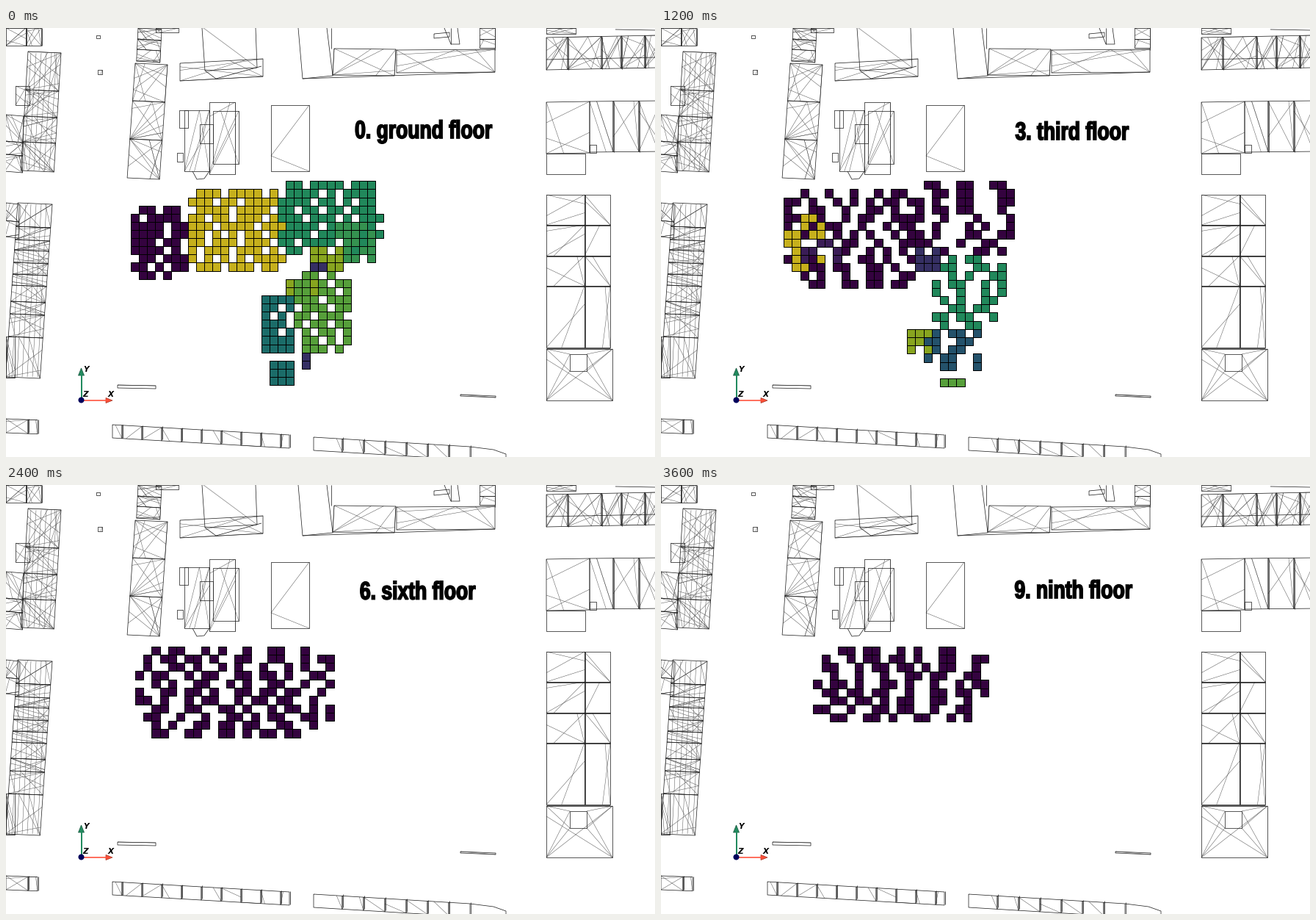
These frames come from a looping animation (884x584 px, 4000 ms). A matplotlib script:

```python
import random
import matplotlib.pyplot as plt
from matplotlib.animation import FuncAnimation
from matplotlib.collections import LineCollection, PolyCollection
from matplotlib.patches import Circle, PathPatch, Polygon
from matplotlib.textpath import TextPath
from matplotlib.transforms import Affine2D

W, H, DPI = 884, 584, 100
PX = 72 / DPI
rng = random.Random(4)

fig = plt.figure(figsize=(W / DPI, H / DPI), dpi=DPI, facecolor="white")
ax = fig.add_axes([0, 0, 1, 1])
ax.set(xlim=(0, W), ylim=(H, 0))
ax.axis("off")

# ---------- surrounding buildings, as wireframes ----------
bold, thin = [], []


def line(*v):
    bold.append(list(zip(v[::2], v[1::2])))


def mix(a, b, t):
    return a[0] + (b[0] - a[0]) * t, a[1] + (b[1] - a[1]) * t


def slab(n, x0, y0, x1, y1, skew=0, tilt=0):
    """Leaning box with n chords running from its corners to its sides."""
    p = [(x0, y0), (x1, y0 + tilt), (x1 + skew, y1 + tilt), (x0 + skew, y1)]
    bold.append(p + p[:1])
    for _ in range(n):
        i = rng.randrange(4)
        j = i + rng.choice((1, 2))
        t = rng.choice((.3, .6, .8, 1))
        thin.append([p[i], mix(p[j % 4], p[(j + 1) % 4], t)])


def column(n, x0, x1, lean, *ys):
    """Houses stacked down the page between the given heights."""
    for a, b in zip(ys, ys[1:]):
        off = lean * (a - ys[0])
        slab(n, x0 - off, a, x1 - off, b, -lean * (b - a), 2 if lean else 0)


def row(n, y0, y1, slope, *xs):
    """Houses side by side along a sloping street."""
    for a, b in zip(xs, xs[1:]):
        dy = slope * (a - xs[0])
        slab(n, a, y0 + dy, b, y1 + dy, 0, slope * (b - a))
        if b < W:
            line(b + 1, y0 + dy, b + 1, y1 + dy)


# east
levels = (227, 268, 310, 351, 435)
column(3, 736, 788, 0, *levels)
column(2, 788, 823, 0, *levels)
for y in levels[1:]:
    line(736, y + 1, 823, y + 1)
line(789, 227, 789, 435)
slab(2, 736, 437, 826, 507)
slab(0, 768, 444, 791, 467)
for x, u in ((736, 768), (826, 791)):
    for y, v in ((437, 444), (507, 467)):
        thin.append([(x, y), (u, v)])
        thin.append([(x, y), (u, 911 - v)])

# north-east
slab(4, 736, 101, 795, 171, 0, -1)
slab(0, 736, 171, 789, 199)
row(3, 100, 169, -.01, 795, 827, 862, 900)
slab(0, 795, 159, 804, 170)
row(9, 13, 57, -.02, 736, 765, 811, 838, 870, 899)
line(736, 43, 884, 40)
slab(5, 736, 0, 776, 8)
line(830, 2, 884, 3)

# north
line(398, 0, 404, 69, 445, 65, 437, 0)
line(404, 69, 666, 60)
slab(7, 447, 28, 531, 64, -2, 1)
slab(6, 532, 30, 666, 61, 0, -1)
line(443, 0, 443, 28)
line(666, 0, 666, 30)
slab(0, 583, 8, 604, 14, 0, -2)
line(597, 0, 606, 22, 618, 22, 615, 0)
line(606, 0, 606, 22)
column(2, 645, 666, 0, 0, 15, 27)
line(267, 0, 271, 58, 342, 54, 340, 0)
slab(5, 237, 48, 350, 72, 0, -6)
line(271, 58, 286, 69, 348, 52)
thin.append([(269, 0), (342, 54)])

# detached houses
slab(4, 277, 101, 312, 199)
slab(2, 282, 113, 317, 185)
slab(5, 243, 112, 277, 195)
slab(0, 236, 112, 248, 136)
slab(0, 233, 170, 241, 182)
slab(0, 264, 131, 282, 157)
line(254, 195, 260, 206, 270, 205, 277, 195)
slab(0, 361, 105, 413, 195)
thin.append([(413, 105), (361, 174), (413, 195)])
slab(0, 123, 10, 128, 14)
slab(1, 125, 57, 131, 63)

# west
column(8, 180, 212, .05, 0, 15, 29, 45)
column(9, 176, 220, .07, 48, 99, 151, 204)
slab(2, 204, 0, 235, 6)
column(11, 30, 75, .06, 32, 84, 120, 155, 194)
column(7, 0, 24, .02, 118, 154, 172, 195)
slab(3, 13, 79, 32, 105)
row(6, 0, 24, 0, 0, 27, 48)
column(7, 16, 63, .07, 238, 270, 288, 302, 319, 335, 350, 372, 389, 420, 475)
column(5, 0, 18, .02, 238, 262, 284)
slab(5, 0, 420, 12, 476)
for i in range(6):
    thin.append([(20 + 7 * i, 240), (8 + 7 * i, 475)])
    thin.append([(34 + 7 * i, 34), (24 + 7 * i, 194)])

# kerbs and southern rows
slab(1, 152, 486, 204, 490, 0, 1)
slab(1, 619, 499, 667, 501, 0, 2)
row(1, 540, 558, .058, 145, 158, *range(185, 377, 27), 386)
row(1, 557, 575, .061, 419, *range(458, 640, 29))
line(632, 570, 664, 574, 681, 580, 681, 584)
row(3, 532, 551, .04, 0, 30, 43)

ax.add_collection(LineCollection(thin, colors="#555555", linewidths=.5 * PX))
ax.add_collection(LineCollection(bold, colors="#222222", linewidths=.75 * PX))

# ---------- axis marker ----------
RED, GREEN = "#ff4f38", "#228b5f"
ax.plot([102.5, 102.5], [506, 472], color=GREEN, lw=2 * PX)
ax.plot([102, 138], [507, 507], color=RED, lw=1.6 * PX)
ax.add_patch(Polygon([(102.5, 463), (98.5, 473), (106.5, 473)], fc=GREEN, ec="#14513a", lw=.5))
ax.add_patch(Polygon([(145, 507), (136, 503.5), (136, 510.5)], fc=RED, ec="#a03020", lw=.5))
ax.add_patch(Circle((102.5, 506.5), 4, fc="#00005c", ec="none", zorder=5))
for x, y, s in ((109, 468, "Y"), (143, 502, "X"), (108, 502, "Z")):
    ax.text(x, y, s, family="DejaVu Sans", weight="bold", style="italic",
            size=10.5 * PX, ha="center", va="baseline")

# ---------- floors ----------
PLUM, VIOLET, INDIGO, NAVY = "#34033f", "#3a1c56", "#352f63", "#2c3f69"
BLUE, PETROL, TEAL, JADE = "#24526b", "#1b6c69", "#1b7668", "#21885b"
MID, LEAF, OLIVE, GOLD = "#359250", "#569f3a", "#88a51f", "#c6b01c"
floors = [{} for _ in range(10)]


def zone(k, color, c0, r0, c1, r1, fill=1):
    """Rounded patch of cells; below a fill of 1, rows break into random runs."""
    cm, rm = (c0 + c1) / 2, (r0 + r1) / 2
    for r in range(r0, r1 + 1):
        c, on = c0, rng.random() < fill
        while c <= c1:
            n = rng.randint(1, 1 + int(3.5 * fill if on else 3 * (1 - fill)))
            for i in range(c, min(c + n, c1 + 1)):
                u, v = abs(i - cm) / (c1 - cm + .5), abs(r - rm) / (r1 - rm + .5)
                if fill == 1 or on and u ** 3 + v ** 3 < 1.3:
                    floors[k][i, r] = color
            c, on = c + n, not on


zone(0, PLUM, 0, 3, 6, 11, .9)
zone(0, GOLD, 7, 1, 18, 10, .9)
zone(0, JADE, 18, 0, 30, 8, .9)
zone(0, MID, 25, 5, 29, 9, .9)
zone(0, OLIVE, 22, 8, 25, 10, .9)
zone(0, OLIVE, 19, 12, 22, 13, .9)
zone(0, LEAF, 20, 11, 26, 20, .8)
zone(0, PETROL, 16, 14, 19, 20, .9)
zone(0, PETROL, 17, 22, 19, 24)
zone(0, INDIGO, 22, 10, 23, 10)
zone(0, INDIGO, 21, 21, 21, 22)

zone(1, PLUM, 0, 4, 4, 11, .4)
zone(1, PLUM, 5, 1, 9, 7, .4)
zone(1, GOLD, 14, 6, 14, 7)
zone(1, GOLD, 13, 4, 13, 4)
zone(1, GOLD, 15, 4, 15, 4)
zone(1, JADE, 19, 0, 28, 8, .15)
zone(1, TEAL, 14, 8, 19, 15, .7)
zone(1, TEAL, 11, 16, 16, 22, .7)
zone(1, TEAL, 15, 22, 19, 24, .7)
zone(1, VIOLET, 16, 11, 19, 17, .3)
zone(1, LEAF, 20, 15, 22, 18, .4)
zone(1, BLUE, 25, 8, 30, 15, .6)
zone(1, NAVY, 21, 17, 29, 24, .7)

zone(2, PLUM, 0, 1, 14, 11, .7)
zone(2, PLUM, 15, 0, 27, 5, .7)
zone(2, OLIVE, 0, 5, 4, 10, .3)
zone(2, LEAF, 20, 4, 24, 7, .7)
zone(2, LEAF, 26, 0, 27, 0)
zone(2, LEAF, 28, 1, 28, 1)
zone(2, INDIGO, 15, 3, 19, 9, .7)
zone(2, TEAL, 20, 7, 28, 17, .7)
zone(2, NAVY, 23, 7, 26, 10, .8)
zone(2, VIOLET, 16, 13, 20, 19, .7)
zone(2, JADE, 13, 16, 16, 24, .3)
zone(2, BLUE, 18, 18, 26, 24, .5)

zone(3, PLUM, 0, 1, 16, 12, .5)
zone(3, PLUM, 15, 0, 27, 8, .3)
zone(3, GOLD, 0, 4, 4, 10, .4)
zone(3, VIOLET, 2, 7, 6, 9, .3)
zone(3, INDIGO, 16, 8, 18, 10, .9)
zone(3, JADE, 18, 9, 26, 17, .4)
zone(3, OLIVE, 15, 18, 18, 20, .8)
zone(3, BLUE, 17, 18, 23, 22, .5)
zone(3, LEAF, 19, 24, 21, 24)

zone(4, PLUM, 0, 1, 20, 12, .5)
zone(4, PLUM, 18, 0, 27, 8, .4)
zone(4, GOLD, 0, 4, 4, 9, .3)

zone(5, PLUM, 0, 1, 21, 12, .5)
zone(5, PLUM, 18, 0, 27, 7, .4)

zone(6, PLUM, 1, 1, 24, 11, .4)

for c, r, n, m in ((8, 2, 2, 1), (6, 4, 2, 2), (9, 6, 1, 1), (8, 7, 2, 1), (15, 4, 1, 2),
                   (16, 5, 1, 2), (17, 6, 1, 2), (18, 7, 1, 1), (20, 5, 2, 2), (22, 6, 1, 1)):
    zone(7, PLUM, c, r, c + n - 1, r + m - 1)

zone(8, PLUM, 4, 1, 24, 9, .4)
zone(9, PLUM, 4, 1, 24, 9, .4)

NAMES = "ground first second third fourth fifth sixth seventh eighth ninth".split()
CENTRES = (569, 553, 568.5, 560, 568, 560.5, 561, 561, 567, 562)
BASES = (151, 149, 157, 153, 154, 158, 156.5, 157, 154, 155)
FACE = dict(family="Liberation Sans", weight="bold")
NARROW = .78


def title(k):
    path = TextPath((0, 0), f"{k}. {NAMES[k]} floor", size=34, prop=FACE)
    b = path.get_extents()
    place = Affine2D().translate(-(b.x0 + b.x1) / 2, 0).scale(NARROW, -1)
    return place.translate(CENTRES[k], BASES[k] - 1).transform_path(path)


def square(c, r, pitch):
    # higher floors are nearer the camera, so they spread from a vanishing point
    x0, x1 = (round(510 + (c + d - 30.7) * pitch) + .5 for d in (0, 1))
    y0, y1 = (round(207.3 + (r + d) * pitch) + .5 for d in (0, 1))
    return [(x0, y0), (x1, y0), (x1, y1), (x0, y1)]


cells = PolyCollection([], edgecolors="black", linewidths=PX, zorder=4)
ax.add_collection(cells)
label = PathPatch(title(0), fc="black", ec="black", lw=1.7 * PX, joinstyle="miter", zorder=4)
ax.add_patch(label)


def draw(k):
    pitch = 11.11 + .03 * k
    cells.set_verts([square(c, r, pitch) for c, r in floors[k]])
    cells.set_facecolor(list(floors[k].values()))
    label.set_path(title(k))
    return cells, label


anim = FuncAnimation(fig, draw, frames=10, interval=400, repeat=True)
plt.show()
```
